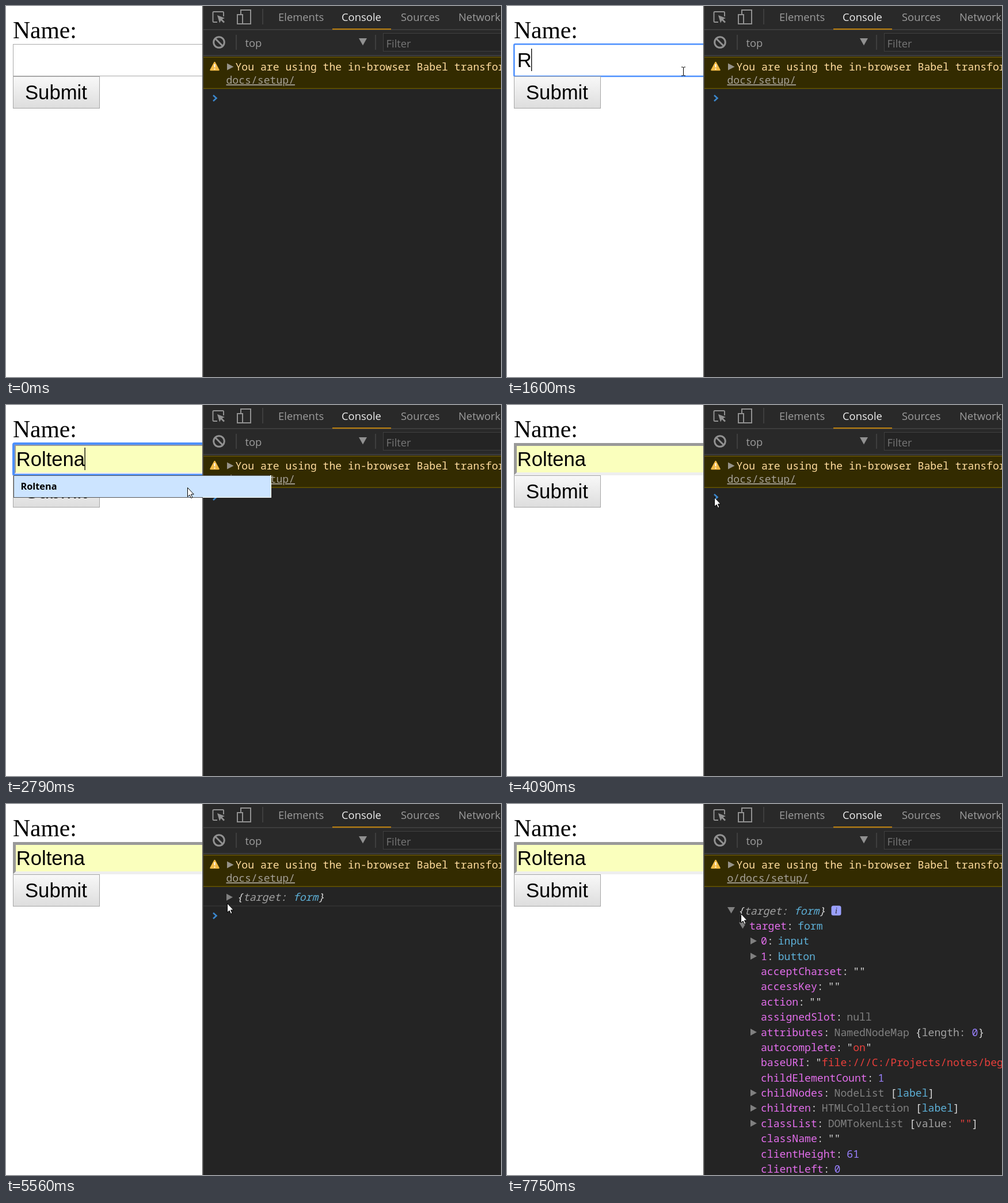
An HTML page for the animation above (8000 ms loop, 860 by 644 pixels).

```html
<!DOCTYPE html>
<html lang="en">
<head>
<meta charset="utf-8">
<title>Form and console</title>
<style>
  html, body { margin: 0; width: 100%; height: 100%; overflow: hidden; background: #fff; }
  svg { display: block; width: 860px; height: 644px; }
  text { white-space: pre; }
  .ui { font: 18.4px "Open Sans", "Noto Sans", sans-serif; fill: #9c9c9c; }
  .ui .active { fill: #eee; }
  .ui .hint { fill: #757575; }
  .mono { font: 500 18.13px "Noto Sans Mono", "DejaVu Sans Mono", monospace; }
  .field { font: 34.67px "Liberation Sans", Arial, sans-serif; }
  .warn { fill: #ffdc9e; }
  .link { fill: #a5a096; text-decoration: underline; font-weight: 400; }
  .italic { font-style: italic; }
  .k { fill: #e36eec; }
  .w { fill: #d8d8d8; }
  .g { fill: #808080; }
  .d { fill: #a2a2a2; }
  .b { fill: #5db0d7; }
  .n { fill: #9980ff; }
  .r { fill: #e93f3b; }
  .p { fill: #8f5297; }
</style>
</head>
<body>
<svg viewBox="0 0 860 644">
  <defs>
    <linearGradient id="face" x2="0" y2="1">
      <stop offset="0" stop-color="#f8f8f8"/>
      <stop offset="1" stop-color="#dddddd"/>
    </linearGradient>
  </defs>

  <rect width="860" height="644" fill="#fff"/>
  <text x="12" y="56" font-family="Liberation Serif, Times New Roman, serif" font-size="41.6">Name:</text>
  <rect id="plain" x="12.5" y="66.5" width="400" height="55" fill="#fff" stroke="#a9a9a9"/>
  <g id="filled">
    <rect x="12" y="66" width="400" height="56" fill="#faffbd"/>
    <path d="M12 117H412V122H12Z" fill="#eee"/>
    <path d="M12 66H412V71H17V117L12 122Z" fill="#999"/>
  </g>
  <rect id="ring" width="400" rx="2" fill="none" stroke="#4d90fe"/>
  <text id="typed" class="field" x="17.7" y="106"></text>
  <rect id="caret" y="74" width="1.3" height="39"/>
  <rect id="button" x="12.5" y="122.5" width="150" height="55" fill="url(#face)"/>
  <text class="field" x="33" y="162">Submit</text>

  <rect x="341" width="519" height="644" fill="#242424"/>
  <rect x="343" width="517" height="86" fill="#292929"/>
  <path d="M343 41H860M343 86H860" stroke="#3d3d3d" stroke-width="2"/>
  <rect x="341" width="2" height="644" fill="#555"/>
  <g fill="none" stroke="#919191" stroke-width="2">
    <path d="M367 28H361Q359.5 28 359.5 26V11.5Q359.5 10 361 10H376.5Q378 10 378 11.5V18"/>
    <path d="M367 16L380 21L375.5 23L380 27.5L378 29.5L373.5 25L371 29.5Z" fill="#919191" stroke="none"/>
    <path d="M408 14V7H425V31H412"/>
    <rect x="402" y="15" width="9" height="16"/>
    <circle cx="370" cy="63" r="9.3" stroke-width="3"/>
    <path d="M363.5 56.5L376.5 69.5" stroke-width="3"/>
  </g>
  <path d="M446 5V32M400 50V76M642 50V76" stroke="#454545" stroke-width="1.5"/>
  <path d="M613 56H627L620 68.5Z" fill="#919191"/>
  <rect x="655.5" y="47.5" width="220" height="31" fill="#242424" stroke="#404040"/>
  <rect x="567" y="39" width="102" height="2.2" fill="#b67c10"/>
  <g class="ui">
    <text x="473" y="26">Elements</text>
    <text x="583" y="26" class="active">Console</text>
    <text x="686" y="26">Sources</text>
    <text x="786" y="26">Network</text>
    <text x="415.5" y="71">top</text>
    <text x="660.5" y="72" class="hint">Filter</text>
  </g>

  <rect x="343" y="88" width="517" height="56" fill="#332b00"/>
  <path d="M343 88.8H860M343 143.2H860" stroke="#665500" stroke-width="1.5"/>
  <path d="M362.5 98L369.5 111H355.5Z" fill="#f2ba45" stroke="#f2ba45" stroke-width="2.5" stroke-linejoin="round"/>
  <path d="M362.5 101V106.5M362.5 108.5V110.5" stroke="#fff" stroke-width="2"/>
  <path d="M384 99.5L395.5 105.5L384 111.5Z" fill="#96938a"/>
  <text class="mono warn" x="398.5" y="111.5">You are using the in-browser Babel transformer.</text>
  <text id="link" class="mono link" x="382.5" y="135"></text>
  <g id="log"></g>
  <path id="divider" d="M343 0H860" stroke="#333" stroke-width="1.5"/>
  <path id="prompt" d="M360 -5L365.5 0L360 5" fill="none" stroke="#3b87cd" stroke-width="2.6"/>

  <g id="popup">
    <rect width="448" height="39" fill="#fff"/>
    <path d="M.5 39V.5H446M0 38.5H329" fill="none" stroke="#555"/>
    <rect id="choice" x="1" y="1" width="446" height="37" fill="#cce4ff"/>
    <text x="12.5" y="25" font-family="Open Sans, Noto Sans, sans-serif" font-size="16.3" font-weight="bold">Roltena</text>
  </g>
  <path id="arrow" d="M.5 .5V16.3L4 13L6.6 18.6L9 17.5L6.5 12H11.3Z" fill="#fff" stroke="#000"/>
  <path id="beam" d="M-3.5 -7.5H-1L0 -6.5L1 -7.5H3.5M0 -6.5V6.5M-3.5 7.5H-1L0 6.5L1 7.5H3.5" fill="none" stroke="#000"/>
</svg>
<script>
const LOOP = 8000, NAME = 'Roltena', ROW = 26.38;
const KEY_TIMES = [1600, 1900, 1970, 2070, 2180, 2350, 2400];
const LOG_TIMES = [5020, 6200, 7750];
const ui = Object.fromEntries([...document.querySelectorAll('[id]')].map(el => [el.id, el]));

// Pointer tip: time, x, y
const POINTER = [
  [100, 668, 601], [460, 440, 300], [700, 288, 124], [820, 306, 116],
  [970, 306, 116], [1060, 306, 113], [2650, 306, 113], [2790, 315, 143],
  [2860, 317, 153], [3000, 317, 153], [3240, 302, 186], [3420, 295, 191],
  [3590, 295, 191], [3850, 335, 176], [4090, 360, 160], [4410, 360, 160],
  [4640, 210, 178], [4900, 106, 158], [4990, 106, 158], [5120, 270, 228],
  [5230, 354, 202], [5610, 387, 169], [5810, 387, 169], [6000, 388, 158],
  [6500, 388, 158], [6630, 401, 180], [6850, 406, 215], [7270, 382, 240],
  [7439, 382, 240], [7440, 403, 181], [7749, 403, 181], [7750, 406, 190]
];

// Each segment starts with the letter of its colour class.
const spans = (segments, gap = 0) => segments.split('|').map((s, i) =>
  `<tspan class="${s[0]}"${i || !gap ? '' : ` dx="${gap}"`}>${s.slice(1)}</tspan>`).join('');

const MARKS = { right: 'l11 6l-11 6z', down: 'h13l-6.5 11z' };

function row(index, level, mark, body, { markColor = 'g', style = '' } = {}) {
  const x = 401 + level * 20, y = index * ROW;
  const shape = mark && `<path d="M${x - 18} ${y - 6}${MARKS[mark]}" class="${markColor}"/>`;
  return `${shape}<text class="mono ${style}" x="${x}" y="${y + 6.5}">${body}</text>`;
}

const property = (index, level, mark, key, value, color = 'k') =>
  row(index, level, mark, spans(`${color}${key}|w:`) + spans(value, 8),
    { markColor: color === 'p' ? 'p' : 'g' });

const summary = mark => row(0, 0, mark, spans('w{|dtarget: |bform|w}'), { style: 'italic' });
const badge = `<rect x="563.5" y="-8.5" width="17" height="17" rx="3.5" fill="#9aa0ff"/>
  <text x="572" y="5" text-anchor="middle" font-family="Liberation Serif, serif" font-size="14" font-style="italic" fill="#242424">i</text>`;

const MEMBERS = [
  ['right', '0', 'binput'],
  ['right', '1', 'bbutton'],
  ['', 'acceptCharset', 'w""'],
  ['', 'accessKey', 'w""'],
  ['', 'action', 'w""'],
  ['', 'assignedSlot', 'gnull'],
  ['right', 'attributes', 'gNamedNodeMap |w{|dlength: |n0|w}'],
  ['', 'autocomplete', 'w"|ron|w"'],
  ['', 'baseURI', 'w"|rfile:///C:/Projects/notes/beginner'],
  ['', 'childElementCount', 'n1'],
  ['right', 'childNodes', 'gNodeList |w[|blabel|w]'],
  ['right', 'children', 'gHTMLCollection |w[|blabel|w]'],
  ['right', 'classList', 'gDOMTokenList |w[|dvalue: |r""|w]'],
  ['', 'className', 'w""'],
  ['', 'clientHeight', 'n61'],
  ['', 'clientLeft', 'n0']
];

const LOGS = [
  '',
  summary('right'),
  summary('down') + badge + property(1, 1, 'right', 'target', 'bform') +
    property(2, 1, 'right', '__proto__', 'wObject', 'p'),
  summary('down') + badge + property(1, 1, 'down', 'target', 'bform') +
    MEMBERS.map(([mark, key, value], i) => property(i + 2, 2, mark, key, value)).join('')
];
const PROMPT_Y = [160, 194, 247, 700];

const set = (el, attributes) => {
  for (const name in attributes) el.setAttribute(name, attributes[name]);
};
const show = (el, on) => { el.style.display = on ? '' : 'none'; };
const move = (el, x, y) => set(el, { transform: `translate(${x} ${y})` });

function pointerAt(t) {
  const next = POINTER.findIndex(p => p[0] > t);
  if (next < 0) return POINTER.at(-1).slice(1);
  if (next === 0) return POINTER[0].slice(1);
  const [t0, x0, y0] = POINTER[next - 1], [t1, x1, y1] = POINTER[next];
  const u = (t - t0) / (t1 - t0), e = (u + u * u * (3 - 2 * u)) / 2;
  return [x0 + (x1 - x0) * e, y0 + (y1 - y0) * e];
}

let shownLog = -1;

function drawLog(log) {
  if (log === shownLog) return;
  shownLog = log;
  const wrapped = log === 3;
  ui.log.innerHTML = LOGS[log];
  move(ui.log, 0, wrapped ? 185 : 161.7);
  ui.link.textContent = wrapped ? 'o/docs/setup/' : 'docs/setup/';
  show(ui.divider, log > 0);
  move(ui.divider, 0, PROMPT_Y[log] - 17);
  move(ui.prompt, 0, PROMPT_Y[log]);
}

function draw(t) {
  const [x, y] = pointerAt(t);
  const focused = t >= 970 && t < 3450;
  const popupOpen = t >= 1650 && t < 3030;
  const choosing = popupOpen && t >= 2680 && y > 122;
  const filled = choosing || t >= 3030;

  show(ui.plain, !filled);
  show(ui.filled, filled);
  show(ui.ring, focused);
  set(ui.ring, filled
    ? { x: 13, y: 67, height: 54.5, 'stroke-width': 4 }
    : { x: 12.3, y: 66.3, height: 55.7, 'stroke-width': 2.6 });

  ui.typed.textContent = NAME.slice(0, KEY_TIMES.filter(k => k <= t).length);
  show(ui.caret, focused);
  set(ui.caret, { x: 17 + ui.typed.getComputedTextLength() });

  show(ui.popup, popupOpen);
  show(ui.choice, choosing);
  set(ui.popup, { opacity: t < 1700 ? 0.5 : 1 });
  if (t < 1900) move(ui.popup, 6, 48);
  else move(ui.popup, 13, 122);

  const hovered = x > 12 && x < 163 && y > 122 && y < 178;
  set(ui.button, { stroke: hovered ? '#777' : '#a6a6a6' });

  drawLog(LOG_TIMES.filter(at => at <= t).length);

  const overInput = x < 342 && y > 66 && y < 122;
  show(ui.arrow, t >= 100 && !overInput);
  show(ui.beam, t >= 100 && overInput);
  move(ui.arrow, Math.round(x), Math.round(y));
  move(ui.beam, Math.round(x) + 0.5, Math.round(y) + 0.5);
}

const start = performance.now();
function tick() {
  draw((performance.now() - start) % LOOP);
  requestAnimationFrame(tick);
}
tick();
</script>
</body>
</html>
```
